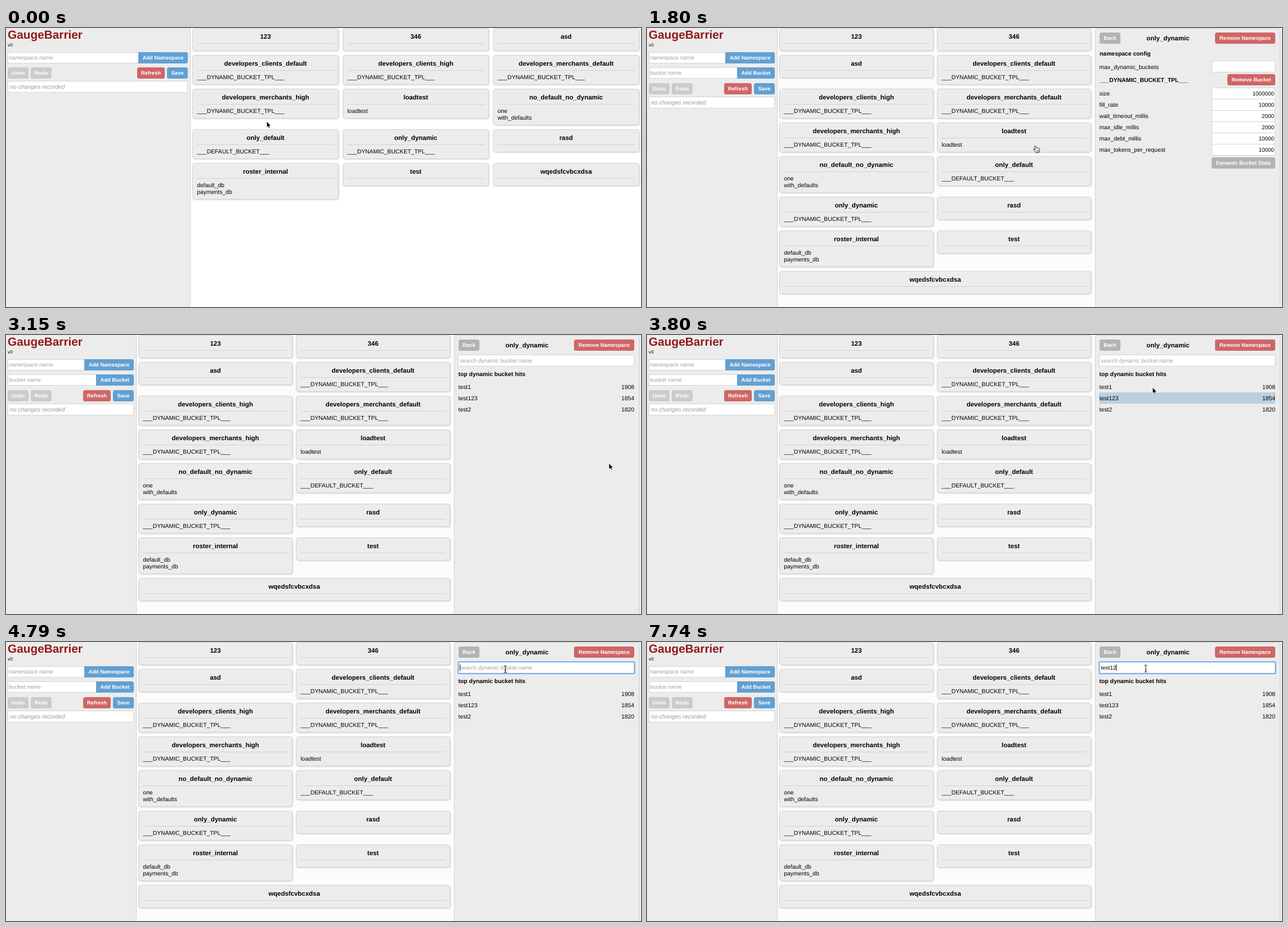
An HTML page for the animation above (8 s loop, 1128x496 px).

```html
<!DOCTYPE html>
<html lang="en">
<head>
<meta charset="utf-8">
<title>GaugeBarrier</title>
<style>
  html, body { margin: 0; width: 100%; height: 100%; overflow: hidden; background: #fff; }
  svg { display: block; }
  text { font: 10.4px "Liberation Sans", Arial, sans-serif; fill: #000; white-space: pre; text-rendering: geometricPrecision; }
  .brand { font-size: 20.8px; font-weight: bold; fill: #931a1c; }
  .small { font-size: 8.32px; }
  .head { font-size: 11.44px; font-weight: bold; }
  .bold { font-weight: bold; }
  .btn { font-size: 9.36px; font-weight: bold; fill: #fff; }
  .field { font-size: 9.88px; }
  .hint { font-size: 9.88px; fill: #a2a2a2; }
  .note { font-style: italic; fill: #999; }
  .card { fill: #ececec; stroke: #d2d2d2; filter: drop-shadow(1px 1px 1px rgba(0, 0, 0, .14)); }
  .box { fill: #fff; stroke: #d4d4d4; }
</style>
</head>
<body>
<svg id="stage" width="1128" height="496" viewBox="0 0 1128 496"></svg>
<script>
const LOOP = 8000;
const BLUE = '#62a0d2', RED = '#d06666', GRAY = '#b3b3b3', PALE = '#cbcbcb';
const TPL = '___DYNAMIC_BUCKET_TPL___';
const stage = document.getElementById('stage');

const CARDS = [
  ['123'], ['346'], ['asd'],
  ['developers_clients_default', TPL],
  ['developers_clients_high', TPL],
  ['developers_merchants_default', TPL],
  ['developers_merchants_high', TPL],
  ['loadtest', 'loadtest'],
  ['no_default_no_dynamic', 'one', 'with_defaults'],
  ['only_default', '___DEFAULT_BUCKET___'],
  ['only_dynamic', TPL],
  ['rasd'],
  ['roster_internal', 'default_db', 'payments_db'],
  ['test'],
  ['wqedsfcvbcxdsa']
];

function make(parent, tag, attrs = {}, content) {
  const node = document.createElementNS('http://www.w3.org/2000/svg', tag);
  for (const key in attrs) node.setAttribute(key, attrs[key]);
  if (content !== undefined) node.textContent = content;
  parent.append(node);
  return node;
}
const group = parent => make(parent, 'g');
const show = (node, on) => node.setAttribute('visibility', on ? 'visible' : 'hidden');

function fill(parent, x, y, width, height, color) {
  return make(parent, 'rect', { x, y, width, height, fill: color });
}
function framed(parent, x, y, w, h, cls, rx = 0) {
  return make(parent, 'rect', { x: x + .5, y: y + .5, width: w - 1, height: h - 1, rx, class: cls });
}
function label(parent, x, y, str, cls = '', anchor = 'start') {
  return make(parent, 'text', { x, y, class: cls, 'text-anchor': anchor }, str);
}
function button(parent, x, y, w, str, color, joined) {
  make(parent, 'rect', { x, y, width: w, height: 20, rx: 3.5, fill: color });
  if (joined) fill(parent, x, y, 5, 20, color);
  label(parent, x + w / 2, y + 13.4, str, 'btn', 'middle');
}
function adder(parent, y, split, right, hint, str) {
  framed(parent, 3, y, split - 2, 20, 'box');
  label(parent, 5.2, y + 13, hint, 'hint');
  button(parent, split, y, right - split, str, BLUE, true);
}

function sidebar(parent, width, withBucket) {
  const right = width - 4;
  fill(parent, 0, 0, width, 496, '#ececec');
  fill(parent, width, 0, 1, 496, '#d4d4d4');
  label(parent, 3, 19, 'GaugeBarrier', 'brand');
  label(parent, 3, 33, 'v0', 'small');
  adder(parent, 43, right - 88, right, 'namespace name', 'Add Namespace');
  if (withBucket) adder(parent, 70, right - 67, right, 'bucket name', 'Add Bucket');
  const y = withBucket ? 98 : 70;
  button(parent, 3, y, 37, 'Undo', PALE);
  button(parent, 44, y, 37, 'Redo', PALE);
  button(parent, right - 90, y, 49, 'Refresh', RED);
  button(parent, right - 37, y, 37, 'Save', BLUE);
  framed(parent, 3, y + 24, right - 3, 21, 'box');
  label(parent, 7, y + 38, 'no changes recorded', 'note');
}

const cardHeight = ([, ...items]) => 41 + 12 * items.length;

function card(parent, x, y, w, data) {
  const [name, ...items] = data;
  framed(parent, x, y, w, cardHeight(data), 'card', 4);
  label(parent, x + w / 2, y + 18.5, name, 'head', 'middle');
  fill(parent, x + 8, y + 27, w - 16, 1, '#d2d2d2');
  items.forEach((item, i) => label(parent, x + 8.3, y + 43 + 12 * i, item));
}
function grid(parent, left, w, pitch, cols) {
  let y = 0;
  for (let i = 0; i < CARDS.length; i += cols) {
    const row = CARDS.slice(i, i + cols);
    const width = row.length < cols ? w + pitch * (cols - 1) : w;
    row.forEach((data, c) => card(parent, left + pitch * c, y, width, data));
    y += Math.max(...row.map(cardHeight)) + 7;
  }
}
function pair(parent, y, name, value) {
  label(parent, 803.5, y, name);
  label(parent, 1116, y, value, '', 'end');
}

// Overview page
const overview = group(stage);
sidebar(overview, 327, false);
grid(overview, 331, 260, 267, 3);

// Page with the detail panel
const detail = group(stage);
fill(detail, 0, 0, 1128, 496, '#fcfcfc');
sidebar(detail, 231, true);
grid(detail, 235, 274, 280, 2);
framed(detail, 796, 0, 329, 510, 'card', 3);
button(detail, 804, 8, 37, 'Back', GRAY);
label(detail, 925.5, 22, 'only_dynamic', 'head', 'middle');
button(detail, 1009, 8, 107, 'Remove Namespace', RED);

// Settings
const config = group(detail);
label(config, 804, 49, 'namespace config', 'bold');
label(config, 803.5, 73, 'max_dynamic_buckets');
framed(config, 1003, 58, 113, 21, 'box');
label(config, 804, 96, TPL, 'bold');
button(config, 1031, 82, 85, 'Remove Bucket', RED);
[['size', 1000000], ['fill_rate', 10000], ['wait_timeout_millis', 2000],
 ['max_idle_millis', 2000], ['max_debt_millis', 10000], ['max_tokens_per_request', 10000]
].forEach(([name, value], i) => {
  const y = 106 + 20 * i;
  label(config, 803.5, y + 14, name);
  framed(config, 1003, y, 113, 21, 'box');
  label(config, 1114, y + 13.5, value, 'field', 'end');
});
button(config, 1003, 230, 113, 'Dynamic Bucket Stats', GRAY);

// Statistics
const stats = group(detail);
const ring = group(stats);
make(ring, 'rect', { x: 803.5, y: 35.5, width: 313, height: 20.5, rx: 1.5, fill: 'none', stroke: '#a9d0f5', 'stroke-width': 3 });
framed(stats, 803, 35, 313, 21, 'box');
const ringLine = make(stats, 'rect', { x: 803.5, y: 35.5, width: 313, height: 20.5, rx: 1, fill: 'none', stroke: '#62a7ea', 'stroke-width': 1.6 });
const hint = label(stats, 806.3, 49, 'search dynamic bucket name', 'hint');
const typed = label(stats, 806.3, 49, '', 'field');
const caret = fill(stats, 806, 40, 1, 11, '#000');
const found = group(stats);
pair(found, 70, 'hits', 1854);
pair(found, 90, 'misses', 0);
const top3 = group(stats);
const hover = fill(top3, 803.5, 102, 312.5, 20, '#b9d0e3');
label(top3, 803.5, 73, 'top dynamic bucket hits', 'bold');
pair(top3, 96, 'test1', 1908);
pair(top3, 116, 'test123', 1854);
pair(top3, 136, 'test2', 1820);

// Mouse pointers, hot spot at 0,0
const cursor = group(stage);
const pointers = { arrow: group(cursor), hand: group(cursor), beam: group(cursor) };
make(pointers.arrow, 'path', {
  d: 'M0 0V11L2.5 8.8 4.2 12.6 6 11.8 4.4 8H7.8Z',
  fill: '#000', stroke: '#fff', 'stroke-width': .9
});
make(pointers.hand, 'path', {
  d: 'M-.6 1.4Q.5-.6 1.7 1L2.5 4.3Q3.7 3.2 4.6 4.5 5.8 3.7 6.5 5 8 4.7 8.2 6.2L8 8.8Q7.4 10 7.2 12.5H1.6Q.6 10.3-2.7 7.4-3 5.8-1.2 6.1L.5 7.4Z',
  fill: '#fff', stroke: '#000', 'stroke-width': .9, 'stroke-linejoin': 'round'
});
make(pointers.hand, 'path', { d: 'M2.9 8V11M4.6 8V11M6.2 8V11', stroke: '#000', 'stroke-width': .6 });
make(pointers.beam, 'path', {
  d: 'M-2.5-6Q0-6 0-4.5 0-6 2.5-6M0-5V5M-2.5 6.5Q0 6.5 0 5 0 6.5 2.5 6.5M-1.3 2.5H1.3',
  fill: 'none', stroke: '#111', 'stroke-width': 1
});

// Spans in which the pointer moves: start, end, number of steps
const MOVES = [[660, 1200, 9], [1560, 1860, 5], [2150, 2740, 11], [2910, 3680, 12], [3740, 4490, 13]];
// Pointer path: time, x, y
const PATH = [
  [0, 463, 166], [660, 467, 167], [795, 505, 175], [930, 592, 192], [1065, 668, 208], [1200, 693, 212],
  [1560, 692, 212], [1710, 691, 212], [1860, 687, 206],
  [2150, 692, 207], [2268, 752, 212], [2445, 931, 227], [2563, 1045, 237], [2740, 1100, 240],
  [2910, 1101, 241], [3050, 1097, 240], [3260, 1020, 205], [3470, 940, 160], [3680, 907, 128],
  [3740, 903, 112], [3802, 898, 93], [3928, 891, 66], [4053, 888, 53], [4300, 887, 48],
  [4790, 887, 48], [4910, 886, 48], [6259, 886, 48], [6260, 886, 47], [LOOP, 886, 47]
];
const SHAPES = [
  [0, 'arrow'], [795, 'hand'], [930, 'arrow'], [990, 'hand'], [2268, 'arrow'], [2550, 'hand'],
  [2970, 'arrow'], [4050, 'beam']
];
const TYPING = [
  [0, ''], [4910, 't'], [5010, 'te'], [5250, 'tes'], [5370, 'test'], [5550, 'test1'], [5640, 'test12'],
  [5730, 'test123'], [7330, 'test12'], [7500, 'test1'], [7740, 'test12']
];
const HOVER = [[0, -1], [3610, 2], [3740, 1], [3850, 0], [3915, -1]];

const at = (table, t) => table.findLast(row => row[0] <= t)[1];
const within = (t, a, b) => t >= a && t < b;

function snap(t) {
  const move = MOVES.find(([a, b]) => within(t, a, b));
  if (!move) return t;
  const [a, b, n] = move, step = (b - a) / (n - 1);
  return a + Math.floor((t - a) / step + .15) * step;
}
function pointerAt(t) {
  const i = Math.max(1, PATH.findIndex(p => p[0] > t));
  const [t0, x0, y0] = PATH[i - 1], [t1, x1, y1] = PATH[i];
  const k = (t - t0) / (t1 - t0);
  return [Math.round(x0 + (x1 - x0) * k), Math.round(y0 + (y1 - y0) * k)];
}
// The pointer rests between the spans
function held(t) {
  if (t < 660) return 0;
  for (const [i, [, b]] of MOVES.entries()) {
    const next = MOVES[i + 1];
    if (next && within(t, b, next[0])) return b;
  }
  return snap(t);
}

function draw(t) {
  const opened = t >= 1800, listed = t >= 2970;
  overview.style.display = opened ? 'none' : '';
  detail.style.display = opened ? '' : 'none';
  config.style.display = listed ? 'none' : '';
  stats.style.display = listed ? '' : 'none';

  const focused = t >= 4430;
  show(ring, focused);
  show(ringLine, focused);
  const str = at(TYPING, t);
  typed.textContent = str;
  show(hint, !str);
  const width = listed && str ? typed.getComputedTextLength() : 0;
  caret.setAttribute('x', Math.round(806.3 + width));
  show(caret, focused && !within(t, 6550, 7030));

  const hit = within(t, 6020, 7330);
  show(found, hit);
  top3.setAttribute('transform', `translate(0 ${hit ? 40 : 0})`);
  const row = at(HOVER, t);
  show(hover, row >= 0);
  hover.setAttribute('y', 82 + 20 * row);

  const [x, y] = pointerAt(held(t));
  cursor.setAttribute('transform', `translate(${x} ${y})`);
  const shape = at(SHAPES, t);
  for (const key in pointers) show(pointers[key], key === shape);
}

function tick() {
  draw(performance.now() % LOOP);
  requestAnimationFrame(tick);
}
tick();
</script>
</body>
</html>
```
